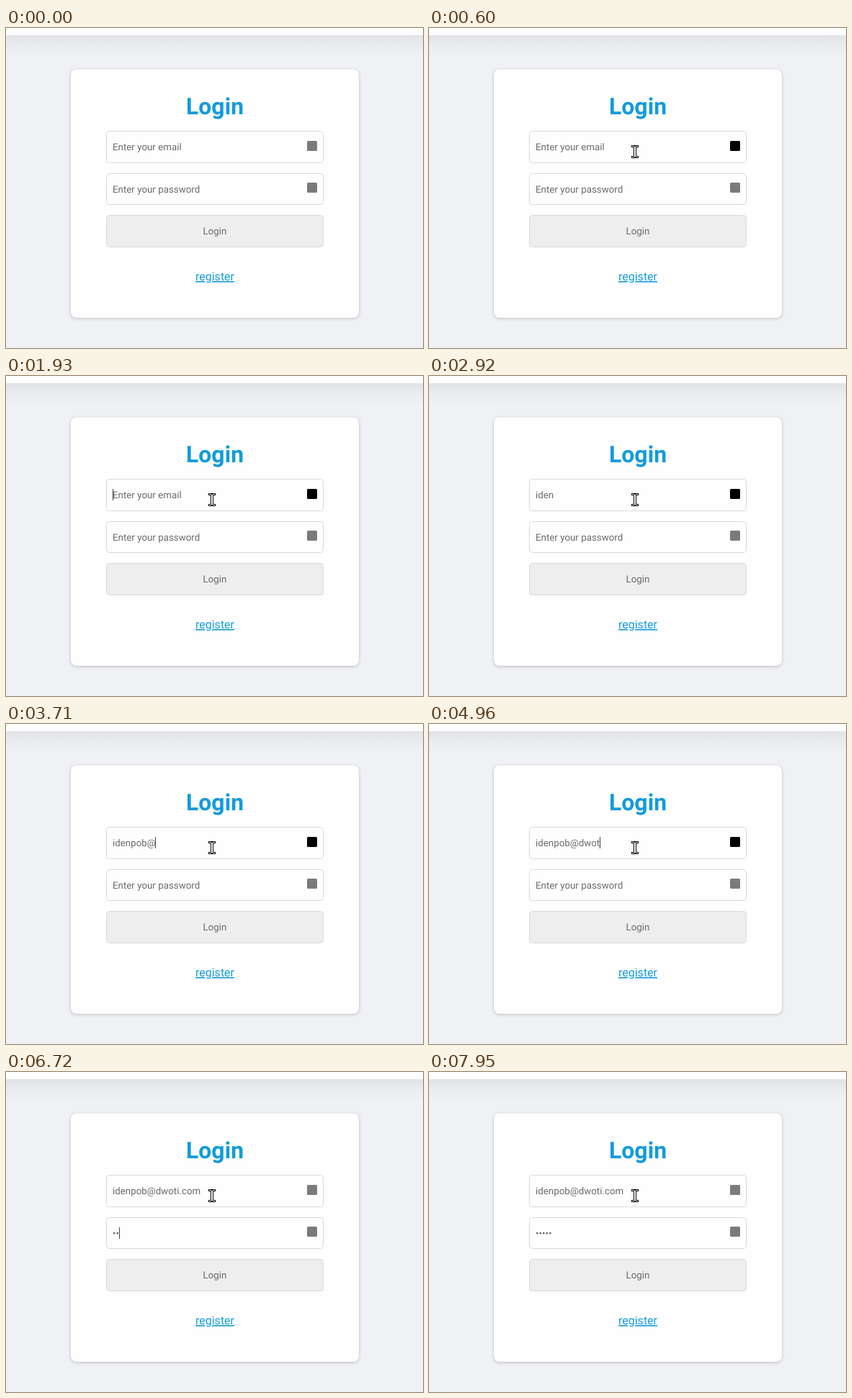
Animation, 579 px wide and 445 px high, one loop 8000 ms. Source, as an HTML page:

```html
<!DOCTYPE html>
<html lang="en">
<head>
<meta charset="utf-8">
<title>Login form</title>
<style>
  html, body { margin: 0; width: 100%; height: 100%; overflow: hidden; background: #f0f1f5; }
  svg { display: block; width: 579px; height: 445px; }
  text { font: 13.3333px Roboto, sans-serif; fill: #6c6a6a; text-rendering: geometricPrecision; white-space: pre; }
  .mid { text-anchor: middle; }
  .title { font-size: 32px; font-weight: 700; fill: #139bdb; }
  .link { font-size: 16px; fill: #139bdb; text-decoration: underline; }
  .card { fill: #fefefe; filter: drop-shadow(0 1px 2px rgba(0, 0, 0, .22)); }
  .box { fill: #fefefe; stroke: #d9d9d9; }
  .button { fill: #edeeed; }
  .icon { fill: #7d7a7a; }
  .hot { fill: #000; }
</style>
</head>
<body>
<svg viewBox="0 0 579 445">
  <defs>
    <linearGradient id="shade" x1="0" y1="0" x2="0" y2="1">
      <stop offset="0" stop-color="#e0e2e6"/>
      <stop offset=".45" stop-color="#e9ebef"/>
      <stop offset="1" stop-color="#f0f1f5"/>
    </linearGradient>
  </defs>
  <rect width="579" height="445" fill="#f0f1f5"/>
  <rect y="10" width="579" height="30" fill="url(#shade)"/>
  <rect width="579" height="10" fill="#fefefe"/>

  <rect class="card" x="90" y="57.5" width="400" height="345.5" rx="8"/>
  <text class="mid title" x="290" y="120">Login</text>

  <rect class="box" x="139.5" y="143.5" width="301" height="44" rx="4"/>
  <text id="email" x="148" y="170"></text>
  <rect id="emailIcon" class="icon" x="418" y="157" width="14" height="14" rx="1.5"/>

  <rect class="box" x="139.5" y="202.5" width="301" height="43" rx="4"/>
  <text id="pass" x="148" y="229"></text>
  <rect class="icon" x="418" y="215" width="14" height="14" rx="1.5"/>

  <rect class="box button" x="139.5" y="260.5" width="301" height="44" rx="4"/>
  <text class="mid" x="290" y="287">Login</text>
  <text class="mid link" x="290" y="351">register</text>

  <rect id="caret" width="1" height="16" fill="#444"/>

  <g id="arrow">
    <path d="M.5 .5V16.5L4.3 13L7 19L9.5 18L6.9 12H12Z" fill="#fff" stroke="#000"/>
  </g>
  <g id="beam" transform="translate(281 163)" shape-rendering="crispEdges">
    <path d="M0 0H10V3H7V15H10V18H0V15H3V3H0Z" fill="#000"/>
    <path d="M1 1H4V2H1ZM6 1H9V2H6ZM4 2H6V16H4ZM1 16H4V17H1ZM6 16H9V17H6Z" fill="#fff"/>
  </g>
</svg>
<script>
const LOOP = 8000, BLINK = 530;
const ADDRESS = "idenpob@dwoti.com";
const CLICK = 800, TAB = 6100;
const emailKeys = [2000, 2130, 2260, 2390, 3090, 3210, 3330, 3710,
  4550, 4690, 4820, 4960, 5260, 5400, 5540, 5690, 5830];
const passKeys = [6570, 6720, 7100, 7260, 7420];
const events = [CLICK, ...emailKeys, TAB, ...passKeys];
const moves = [330, 400, 470, 530, 600];
const from = { x: 489, y: 428 }, to = { x: 285, y: 163 };

const get = id => document.getElementById(id);
const [email, pass, icon, caret, arrow, beam] =
  ["email", "pass", "emailIcon", "caret", "arrow", "beam"].map(get);
const count = (times, t) => times.filter(k => k <= t).length;
const show = (el, on) => el.setAttribute("visibility", on ? "visible" : "hidden");

function setText(el, text) {
  if (el.textContent !== text) el.textContent = text;
}

function drawCaret(t, typed) {
  const last = events[count(events, t) - 1];
  const on = t >= CLICK && Math.floor((t - last) / BLINK) % 2 === 0;
  show(caret, on);
  if (!on) return;
  const field = t < TAB ? email : pass;
  const width = typed ? field.getComputedTextLength() : 0;
  caret.setAttribute("x", Math.floor(148 + width));
  caret.setAttribute("y", t < TAB ? 157 : 216);
}

function drawPointer(t) {
  const step = count(moves, t), end = moves.length;
  show(beam, step === end);
  show(arrow, step > 0 && step < end);
  const p = Math.max(0, step - 1) / (end - 1);
  const ease = p * (1.5 - p / 2);
  const x = Math.round(from.x + (to.x - from.x) * ease);
  const y = Math.round(from.y + (to.y - from.y) * ease);
  arrow.setAttribute("transform", `translate(${x} ${y})`);
}

function draw(t) {
  const letters = count(emailKeys, t), dots = count(passKeys, t);
  setText(email, ADDRESS.slice(0, letters) || "Enter your email");
  setText(pass, "•".repeat(dots) || "Enter your password");
  icon.classList.toggle("hot", t >= 600 && t < TAB);
  drawCaret(t, t < TAB ? letters : dots);
  drawPointer(t);
}

const start = performance.now();
function tick() {
  draw((performance.now() - start) % LOOP);
  requestAnimationFrame(tick);
}
tick();
</script>
</body>
</html>
```
